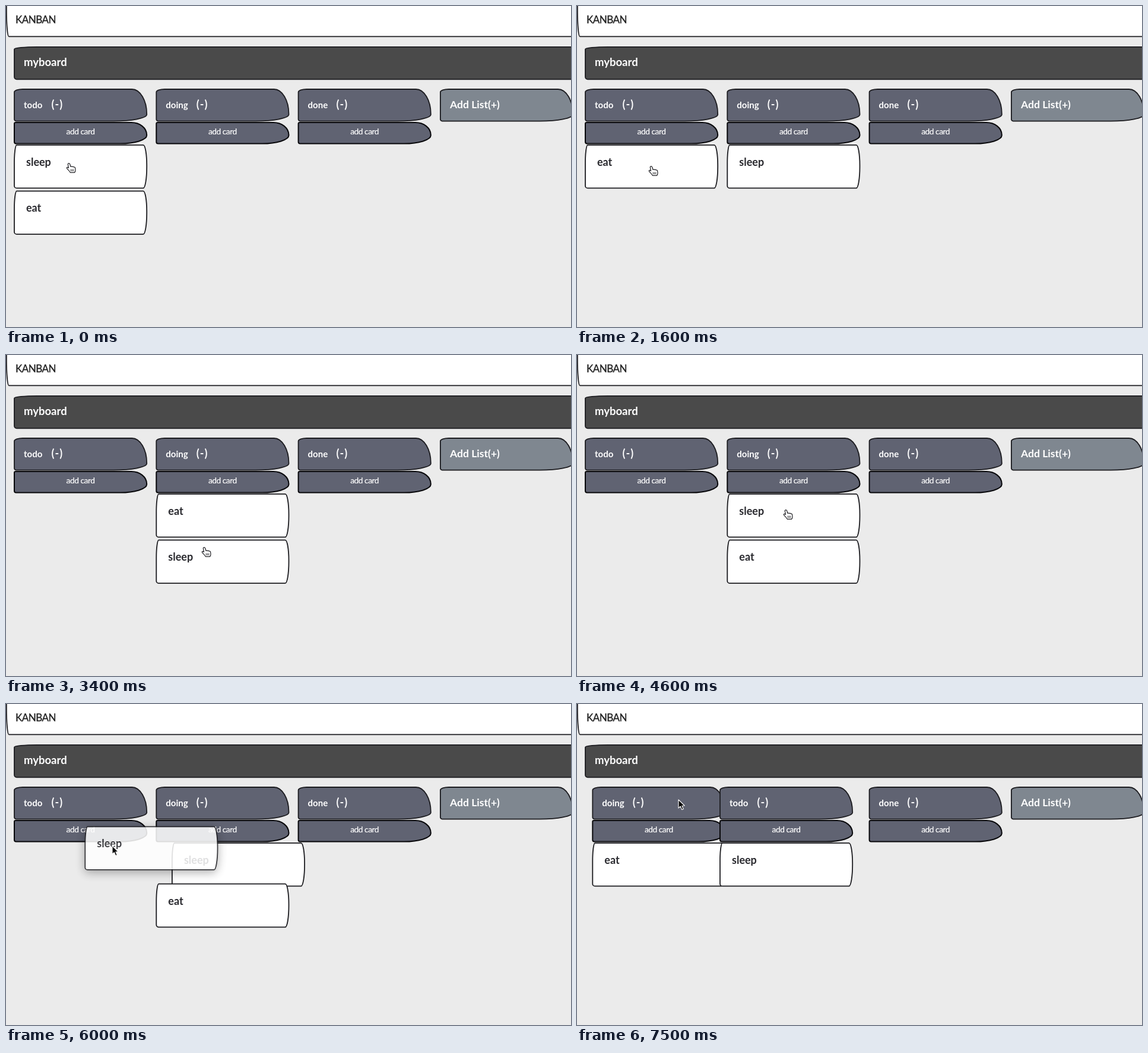
Recreate the animation shown at these times as an HTML page. Size 952x540 px, loop 7600 ms.

```html
<!DOCTYPE html>
<html lang="en">
<head>
<meta charset="utf-8">
<title>Kanban board</title>
<style>
  html, body { margin: 0; width: 100%; height: 100%; overflow: hidden; background: #ebebeb; }
  svg { position: fixed; left: 0; top: 0; display: block; }
  text { font-family: Lato, "Open Sans", sans-serif; font-weight: 700; fill: #fff; }
  path { stroke: #1c1c20; stroke-width: 1.8px; stroke-linejoin: round; }
  .bar, .card { fill: #fff; }
  .board { fill: #4a4a4a; }
  .head, .button { fill: #606372; }
  .more { fill: #7f8790; }
  .button { stroke: #08080b; stroke-width: 2px; }
  .brand { font-size: 17px; font-weight: 400; letter-spacing: -.5px; fill: #222; stroke: #222; stroke-width: .35px; }
  .title { font-size: 18.5px; }
  .name { font-size: 15px; }
  .fold { font-size: 18px; letter-spacing: 1px; }
  .new { font-size: 17.6px; }
  .add { font-size: 13.8px; font-weight: 400; letter-spacing: -.5px; text-anchor: middle; stroke: #fff; stroke-width: .2px; }
  .task { font-size: 18px; fill: #29292e; }
  #ghost { opacity: .86; filter: drop-shadow(0 4px 8px rgba(0, 0, 0, .36)); }
  #hand path { fill: #fff; stroke-width: 1.2px; }
  #hand .lines { fill: none; stroke-width: .9px; }
  #arrow { fill: #050505; stroke: #fff; stroke-width: 1.1px; }
</style>
</head>
<body>
<svg width="952" height="540" viewBox="0 0 952 540">
  <g id="page"></g>
  <g id="items"></g>
  <g id="ghost"></g>
  <g id="hand">
    <path d="M-1.7 1.3Q-1.5-.6.2-.3Q1.5 0 2 2L2.8 5.2Q4.4 4.2 5.4 5.5Q7 4.6 8 6Q10.3 5.4 10.7 8L11 11Q11 13.5 9.5 15.2H2.4Q.8 12.5-1.2 10.6Q-4 8-3.7 7Q-2.8 5.6-.5 7.3Z"/>
    <path class="lines" d="M3.3 9.5V13M5.5 9.5V13M7.7 9.5V13"/>
  </g>
  <path id="arrow" d="M0 0V14.2L3.3 11.2L5.8 16.8L8.3 15.7L5.9 10.3L10.2 10Z"/>
</svg>
<script>
const LOOP = 7600, STEP = 100, FLIP = 150, SETTLE = 200;
const LEFT = 14, PITCH = 239.3, WIDTH = 223.2, TOP = 140, CARD_TOP = 233.8, ROW = 77.5;
const $ = id => document.getElementById(id);
const mix = (a, b, p) => a + (b - a) * p;
const mixPoint = (a, b, p) => [mix(a[0], b[0], p), mix(a[1], b[1], p)];
const smooth = p => p * p * (3 - 2 * p);
const easeOut = p => 1 - (1 - p) ** 2;
const clamp = p => Math.min(1, Math.max(0, p));

// Box with elliptical corners, clockwise from the top left.
function box(cls, x, y, w, h, tl, tr, br, bl) {
  const arc = (r, dx, dy) => `a${r} 0 0 1 ${dx} ${dy}`;
  return `<path class="${cls}" d="M${x + tl[0]} ${y}H${x + w - tr[0]}${arc(tr, tr[0], tr[1])}
    V${y + h - br[1]}${arc(br, -br[0], br[1])}H${x + bl[0]}${arc(bl, -bl[0], -bl[1])}
    V${y + tl[1]}${arc(tl, tl[0], -tl[1])}Z"/>`;
}
const label = (cls, x, y, text) => `<text class="${cls}" x="${x}" y="${y}">${text}</text>`;
const shift = (x, y) => `translate(${x.toFixed(2)} ${y.toFixed(2)})`;
const head = cls => box(cls, 0, 0, WIDTH, 53.6, [14, 5], [25, 42], [56, 11], [3, 3]);

const card = text =>
  box('card', 0, 0, WIDTH, 72.6, [4, 30], [6, 34], [6, 36], [4, 4]) + label('task', 20, 35, text);
const list = (text, foldX) =>
  head('head') + box('button', 0, 56, WIDTH, 35.6, [2, 2], [26, 21], [45, 14], [3, 3]) +
  label('name', 16, 31.8, text) + label('fold', foldX, 31.5, '(-)') +
  label('add', 111.5, 75.9, 'add card');

const art = {
  todo: list('todo', 62.5), doing: list('doing', 67.5), done: list('done', 64),
  sleep: card('sleep'), eat: card('eat')
};

$('page').innerHTML =
  box('bar', .8, -20, 1100, 71.3, [2, 2], [2, 2], [2, 2], [4, 44]) + label('brand', 16, 29, 'KANBAN') +
  box('board', LEFT, 68.8, 1100, 54.5, [38, 4], [2, 2], [2, 2], [4, 4]) + label('title', 30, 100.5, 'myboard') +
  `<g transform="${shift(LEFT + 3 * PITCH, TOP)}">${head('head more')}${label('new', 16, 32, 'Add List(+)')}</g>`;

// Pointer gestures: path points are evenly spaced in time; moves are [time, list or column].
const gestures = [
  { item: 'sleep', start: 900, end: 1300, path: [[106, 265], [330, 266]], moves: [[1150, 'doing']] },
  { item: 'eat', start: 1800, end: 2300, path: [[125, 270], [375, 266]], moves: [[2050, 'doing']] },
  { item: 'sleep', start: 3600, end: 4200, path: [[334, 324], [338, 235]], moves: [[3950, 'doing']] },
  { start: 4600, end: 4800, path: [[352, 261], [299, 266]], moves: [] },
  { item: 'sleep', start: 4800, end: 6400,
    path: [[299, 266], [495, 258], [505, 205], [179, 238.5], [62, 267]],
    moves: [[5200, 'done'], [5900, 'doing'], [6050, 'todo']] },
  { item: 'doing', carries: 'eat', start: 7100, end: 7500, path: [[394, 170], [171, 161]], moves: [[7384, 0]] }
];

// Board state after each move, as item positions in paint order.
let columns = [['todo', 'sleep', 'eat'], ['doing'], ['done']];
function layout(at) {
  const spots = {};
  columns.forEach((names, col) => names.forEach((name, i) => {
    spots[name] = [LEFT + col * PITCH, i ? CARD_TOP + (i - 1) * ROW : TOP];
  }));
  return { at, spots };
}
function apply(item, target) {
  if (item in Object.fromEntries(columns.map(c => [c[0], c]))) {
    const moved = columns.find(c => c[0] === item);
    columns = columns.filter(c => c !== moved);
    columns.splice(target, 0, moved);
  } else {
    columns = columns.map(c => c.filter(name => name !== item));
    columns.find(c => c[0] === target).splice(1, 0, item);
  }
}
const layouts = [layout(0)];
for (const { item, moves } of gestures) {
  for (const [at, target] of moves) {
    apply(item, target);
    layouts.push(layout(at));
  }
}

const nodes = {};
for (const name in art) {
  nodes[name] = document.createElementNS('http://www.w3.org/2000/svg', 'g');
  nodes[name].innerHTML = art[name];
}

function spot(name, t) {
  const i = layouts.findLastIndex(l => l.at <= t);
  const p = easeOut(clamp((t - layouts[i].at) / FLIP));
  return mixPoint(layouts[Math.max(0, i - 1)].spots[name], layouts[i].spots[name], p);
}

function pointer(t) {
  const i = gestures.findLastIndex(g => g.start <= t);
  if (i < 0) return gestures[0].path[0];
  const { start, end, path } = gestures[i], next = gestures[i + 1];
  if (t < end || !next) {
    const u = clamp((t - start) / (end - start)) * (path.length - 1);
    const k = Math.min(Math.floor(u), path.length - 2);
    return mixPoint(path[k], path[k + 1], smooth(u - k));
  }
  const travel = next.start - SETTLE - end;
  return mixPoint(path.at(-1), next.path[0], smooth(clamp((t - end) / travel)));
}

function draw(t) {
  const order = layouts.findLast(l => l.at <= t).spots;
  for (const name in order) {
    nodes[name].setAttribute('transform', shift(...spot(name, t)));
    $('items').append(nodes[name]);
  }

  const [x, y] = pointer(t);
  const drag = gestures.find(g => g.item && t >= g.start && t < g.end);
  $('ghost').innerHTML = '';
  if (drag) {
    const home = spot(drag.item, drag.start), grab = drag.path[0];
    const load = drag.carries ? `<g transform="${shift(0, CARD_TOP - TOP)}">${art[drag.carries]}</g>` : '';
    $('ghost').innerHTML = art[drag.item] + load;
    $('ghost').setAttribute('transform', shift(home[0] + x - grab[0], home[1] + y - grab[1]));
  }

  const arrow = Boolean(drag) || y < CARD_TOP;
  $('arrow').style.display = arrow ? '' : 'none';
  $('hand').style.display = arrow ? 'none' : '';
  $(arrow ? 'arrow' : 'hand').setAttribute('transform', shift(x, y));
}

const begin = performance.now();
let last = -1;
function tick() {
  const t = Math.floor((performance.now() - begin) % LOOP / STEP) * STEP;
  if (t !== last) draw(last = t);
  requestAnimationFrame(tick);
}
tick();
</script>
</body>
</html>
```
